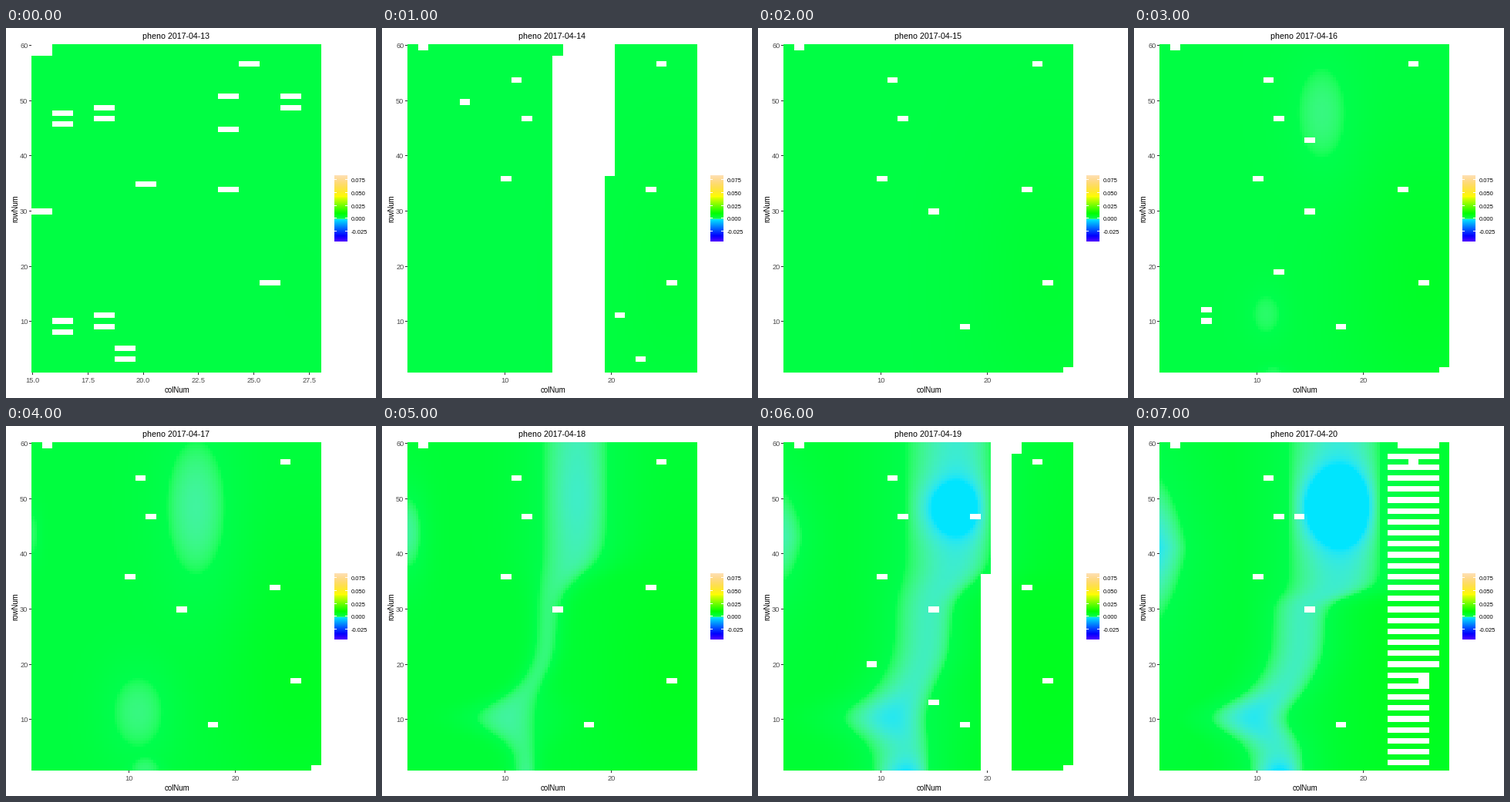
Animation, 480 px wide and 480 px high, one loop 8 s. Source, as a matplotlib script:

```python
import colorsys
import numpy as np
import matplotlib.pyplot as plt
from matplotlib.animation import FuncAnimation
from matplotlib.patches import Rectangle

SIZE, DPI = 480, 100
LEFT, TOP, WIDTH, HEIGHT = 33, 21, 376, 426
ROWS, COLS = 60, 28
FONT = "Liberation Sans"

# ---- colour scale: 100 topographic colours blended in Lab ----
M = np.array([[.4124, .3576, .1805], [.2126, .7152, .0722], [.0193, .1192, .9505]])
WHITE = M.sum(axis=1)


def to_lab(rgb):
    lin = np.where(rgb > .04045, ((rgb + .055) / 1.055) ** 2.4, rgb / 12.92)
    t = lin @ M.T / WHITE
    f = np.where(t > .008856, np.cbrt(t), 7.787 * t + 16 / 116)
    x, y, z = np.moveaxis(f, -1, 0)
    return np.stack([116 * y - 16, 500 * (x - y), 200 * (y - z)], -1)


def to_rgb(lab):
    light, a, b = np.moveaxis(lab, -1, 0)
    y = (light + 16) / 116
    f = np.stack([y + a / 500, y, y - b / 200], -1)
    t = np.where(f > .2069, f ** 3, (f - 16 / 116) / 7.787)
    lin = np.clip((t * WHITE) @ np.linalg.inv(M).T, 0, 1)
    return np.where(lin > .0031308, 1.055 * lin ** (1 / 2.4) - .055, 12.92 * lin)


hues = np.concatenate([np.linspace(43, 31, 34), np.linspace(23, 11, 33),
                       np.linspace(10, 6, 33)]) / 60
sats = np.concatenate([np.ones(67), np.linspace(1, .3, 33)])
STOPS = to_lab(np.array([colorsys.hsv_to_rgb(h, s, 1) for h, s in zip(hues, sats)]))
CYAN = 33  # last blue stop; the next one is green


def shade(pos):
    """Colour at a position on the scale, counted in stops."""
    lab = [np.interp(pos, np.arange(100), STOPS[:, k]) for k in range(3)]
    return to_rgb(np.stack(lab, -1))


# ---- fields in stops above cyan, on a grid finer than the plots ----
NX, NY = COLS * 4, ROWS * 2
X, Y = np.meshgrid(LEFT + (np.arange(NX) + .5) * WIDTH / NX,
                   TOP + (np.arange(NY) + .5) * HEIGHT / NY)


def deepen(q, depth):
    return np.where(q > 0, depth * q, q)


def bump(cx, cy, rx, ry, depth, power=2):
    q = 1 - np.abs((X - cx) / rx) ** power - np.abs((Y - cy) / ry) ** power
    return deepen(q, depth)


def hill(cy, h):
    return np.exp(-((Y - cy) / h) ** 2)


def above(cy, k):
    return 1 / (1 + np.exp((Y - cy) / k))


def ridge(neck, k, shift, dip, width, depth, core, lean):
    """Winding band: wide head above the neck, a belly and a foot below.

    width and depth hold the values of the neck and what the other parts add.
    """
    head, belly, foot = above(neck, k), hill(378, 29), hill(452, 22)
    center = 185 + 29 * above(322, 16) + shift * head - dip * belly
    half = width[0] + width[1] * head + width[2] * belly
    deep = depth[0] + depth[1] * head + depth[2] * belly + depth[3] * foot
    core_y, core_h, core_depth = core
    u = (X - center) / half
    u = u - lean * np.maximum(1 - u ** 2, 0)
    return deepen(1 - u ** 2, deep + core_depth * hill(core_y, core_h))


def field(west, east, *parts):
    base = west + (east - west) * np.exp(-((X - 380) / 110) ** 2) * hill(330, 200)
    if not parts:
        return base
    v = np.maximum.reduce(parts)
    outside = 1 + (base - 1) * (1 - np.exp(.4 * np.minimum(v, 0)))
    return np.maximum(np.where(v > 0, 1 - v, outside), 0)


FIELDS = [
    field(1.9, 2),
    field(1.7, 3),
    field(1.8, 3.5),
    field(1.9, 4.8, bump(243, 110, 31, 59, .25), bump(171, 371, 17, 24, .13),
          bump(180, 447, 12, 7, .1)),
    field(2.4, 5.2, bump(246, 105, 38, 88, .42), bump(171, 371, 32, 45, .25),
          bump(180, 447, 18, 18, .2), bump(33, 140, 8, 25, .12)),
    field(3.2, 5.6, bump(33, 138, 17, 45, .4),
          ridge(193, 14, 36, 25, (13, 29, 25), (.22, .32, .2, .1),
                (90, 55, .12), .08)),
    field(3.6, 5.7, bump(33, 143, 24, 58, .5, 1.5),
          ridge(205, 12, 33, 21, (37, 19, 17), (.6, .1, .3, .4),
                (106, 38, .75), .18)),
    field(3.9, 5.8, bump(33, 158, 35, 92, .9, 1.3),
          ridge(219, 7, 46, 36, (35, 25, 15), (.6, .1, .3, .45),
                (104, 47, 1.2), .1)),
]


# ---- missing plots as (col, row) ----
def block(c0, c1, r0, r1, step=1):
    return [(c, r) for c in range(c0, c1 + 1) for r in range(r0, r1 + 1, step)]


EAST = [(25, 57), (24, 34), (26, 17)]
COMMON = EAST + [(2, 60), (11, 54), (12, 47), (10, 36)]
LATER = COMMON + [(15, 30), (18, 9)]
CORNER = [(28, 1)]
PAIRS = [(16, 46), (18, 47), (27, 49), (16, 8), (18, 9), (19, 3)]
HOLES = [
    EAST + [(c, r + d) for c, r in PAIRS for d in (0, 2)]
    + block(15, 15, 59, 60) + [(15, 30), (20, 35), (24, 51), (24, 45)],
    COMMON + [(6, 50), (21, 11), (23, 3)] + block(15, 15, 1, 58)
    + block(16, 19, 1, 60) + block(20, 20, 37, 60),
    LATER + CORNER,
    LATER + CORNER + [(15, 43), (12, 19), (5, 12), (5, 10)],
    LATER + CORNER,
    LATER,
    LATER + CORNER + [(19, 47), (9, 20), (15, 13)] + block(21, 22, 1, 60)
    + block(20, 20, 1, 36) + block(23, 23, 59, 60),
    LATER + [(14, 47)] + block(24, 27, 60, 60) + block(23, 27, 20, 58, 2)
    + block(23, 26, 2, 18, 2),
]


def pick(count, pixels):
    return np.arange(pixels) * count // pixels


def panel(day):
    first = 15 if day == 0 else 1
    there = np.ones((ROWS, COLS - first + 1), bool)
    for col, row in HOLES[day]:
        there[ROWS - row, col - first] = False
    mask = there[np.ix_(pick(ROWS, HEIGHT), pick(there.shape[1], WIDTH))]
    rgb = shade(CYAN + FIELDS[day])[np.ix_(pick(NY, HEIGHT), pick(NX, WIDTH))]
    return np.where(mask[..., None], rgb, 1)


def picture(day):
    img = np.ones((SIZE, SIZE, 3))
    img[TOP:TOP + HEIGHT, LEFT:LEFT + WIDTH] = panel(day)
    img[191:277, 426:443] = shade(np.linspace(99, 0, 86))[:, None]
    return img


# ---- stage ----
fig = plt.figure(figsize=(SIZE / DPI, SIZE / DPI), dpi=DPI, facecolor="white")
ax = fig.add_axes([0, 0, 1, 1])
ax.axis("off")
image = ax.imshow(np.ones((SIZE, SIZE, 3)), extent=(0, SIZE, SIZE, 0),
                  interpolation="nearest", aspect="auto")
ax.set_xlim(0, SIZE)
ax.set_ylim(SIZE, 0)


def label(x, y, text, px, ha="center", va="baseline", color="black", **kw):
    return ax.text(x, y, text, fontsize=px * 72 / DPI, family=FONT, ha=ha,
                   va=va, color=color, **kw)


def bar(x, y, w, h, color):
    return ax.add_patch(Rectangle((x, y), w, h, fc=color, lw=0, antialiased=False))


def x_tick(x, text):
    return [bar(round(x), 447, 1, 3, "#333333"),
            label(x + .5, 460, text, 9.25, color="#4d4d4d")]


title = label(220.7, 14, "", 10.65)
label(221.5, 473, "colNum", 9.75)
label(12, 234, "rowNum", 9.6, va="center", rotation=90)

for row in range(10, 61, 10):
    y = 380.5 - (row - 10) * 7.17
    bar(30, round(y), 3, 1, "#333333")
    label(28.5, y + 4, str(row), 9.25, ha="right", color="#4d4d4d")

narrow = [a for k in range(6) for a in x_tick(34 + 71.8 * k, f"{15 + 2.5 * k:.1f}")]
wide = [a for k in range(2) for a in x_tick(159 + 138 * k, str(10 + 10 * k))]

for k in range(5):
    y = 196 + round(16.75 * k)
    bar(426, y, 3, 1, "white")
    bar(440, y, 3, 1, "white")
    label(447.7, y + 4, f"{(3 - k) * .025:.3f}", 7.7, ha="left")

PICTURES = [picture(day) for day in range(8)]


def draw(day):
    image.set_data(PICTURES[day])
    title.set_text(f"pheno 2017-04-{13 + day}")
    for a in narrow:
        a.set_visible(day == 0)
    for a in wide:
        a.set_visible(day > 0)
    return []


anim = FuncAnimation(fig, draw, frames=8, interval=1000, repeat=True, blit=False)
plt.show()
```
